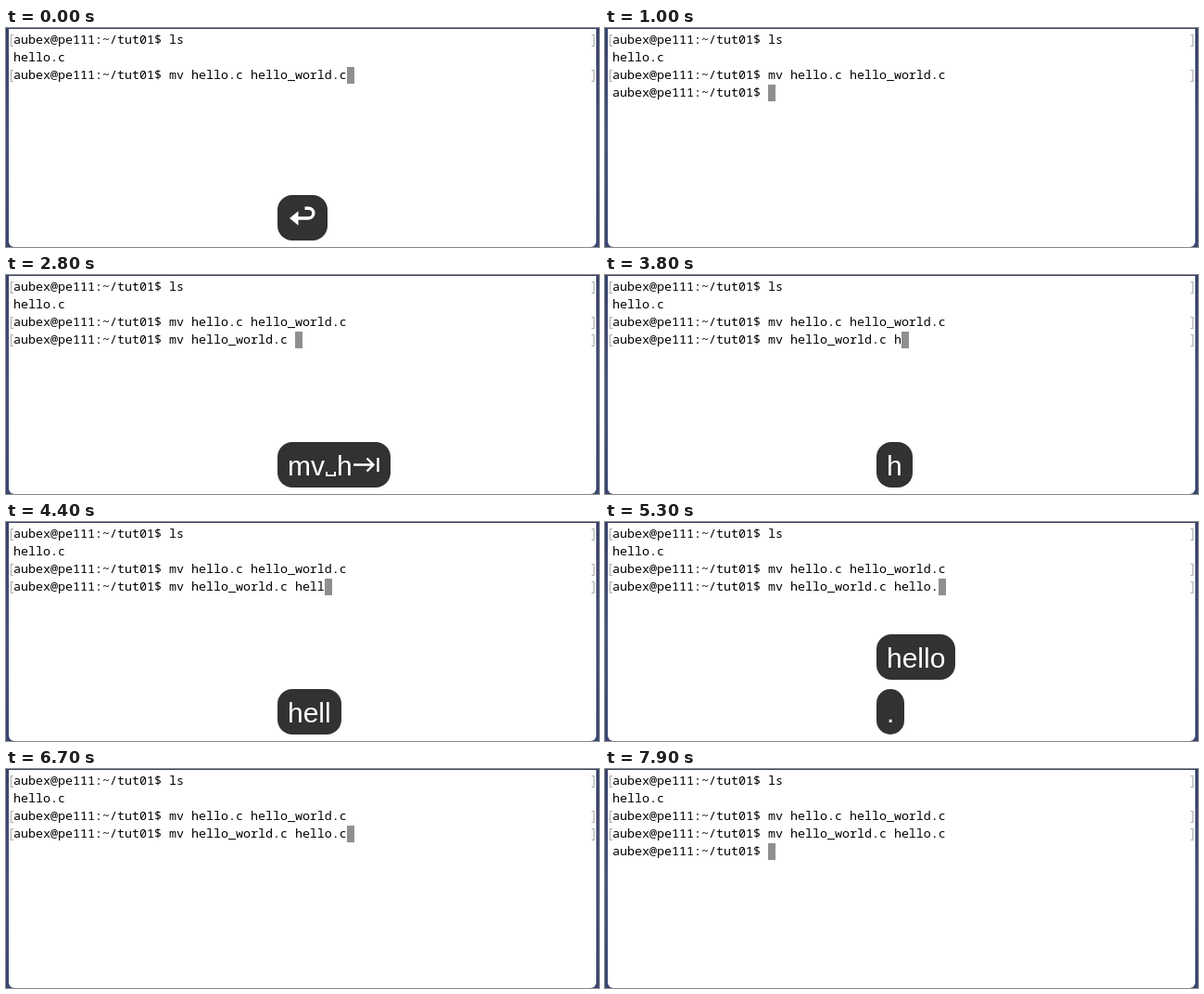
Animation of 640x236 px, one loop 8000 ms. Source, as an HTML page:

```html
<!DOCTYPE html>
<html lang="en">
<head>
<meta charset="utf-8">
<title>Renaming files in a terminal</title>
<style>
  html, body { margin: 0; width: 100%; height: 100%; overflow: hidden; }
  body { position: relative; background: linear-gradient(#36416c, #46517f 50%, #3a4672); }
  .window {
    position: absolute; inset: 1px 3px 0; background: #fff;
    border-radius: 0 0 6px 6px;
  }
  #screen {
    position: absolute; left: 8px; top: 3px; margin: 0; color: #000;
    font: 13.333px/19px "Noto Sans Mono", monospace;
  }
  #cursor { position: absolute; width: 8px; height: 18px; background: #8f8f8f; }
  .mark {
    position: absolute; left: 5px; width: 630px; height: 13px;
    --line: linear-gradient(#adadad, #adadad);
    background:
      var(--line) 0 0 / 1px 100%, var(--line) 100% 0 / 1px 100%,
      var(--line) 0 0 / 3px 1px, var(--line) 0 100% / 3px 1px,
      var(--line) 100% 0 / 3px 1px, var(--line) 100% 100% / 3px 1px;
    background-repeat: no-repeat;
  }
  .keys {
    position: absolute; left: 293px; top: 180px; height: 49px; padding: 0 11px;
    border-radius: 16px; background: #323232; color: #fff; white-space: pre;
    font: 30px/51px "Liberation Sans", Arial, sans-serif;
  }
  .keys svg {
    display: inline-block; height: 49px; vertical-align: top;
    fill: none; stroke: #fff; stroke-width: 2.4;
  }
  .keys .solid { fill: #fff; stroke: none; }
</style>
</head>
<body>
<div class="window"></div>
<div class="mark" style="top:7px"></div>
<div class="mark" style="top:45px"></div>
<div class="mark" id="lastMark" style="top:64px"></div>
<div id="cursor"></div>
<pre id="screen"></pre>

<script>
const LOOP = 8000, FADE = 200, CELL = 8, ROW = 19;
const prompt = "aubex@pe111:~/tut01$ ";
const history = prompt + "ls\nhello.c\n" + prompt + "mv hello.c hello_world.c";

// [time, text typed after the first command]
const typed = [[0, ""], [100, "\n" + prompt]];
const type = (time, text) => typed.push([time, "\n" + prompt + text]);
type(2300, "m");
type(2400, "mv");
type(2600, "mv ");
type(2700, "mv h");
type(2800, "mv hello_world.c ");
[3800, 4000, 4200, 4400, 4600, 5300, 5800].forEach((time, i) =>
  type(time, "mv hello_world.c " + "hello.c".slice(0, i + 1)));
type(7000, "mv hello_world.c hello.c\n" + prompt);

const icon = (width, shapes) => `<svg width="${width}" viewBox="0 0 ${width} 49">${shapes}</svg>`;
const enter = icon(32, `<path stroke-width="3.4" d="M9 25H22.5A5.4 5.4 0 0 0 22.5 14.2H18.5"/>
  <path class="solid" d="M2 25L11.5 17.2V32.8Z"/>`);
const space = icon(13, '<path stroke-width="2" d="M2 32V36H11V32"/>');
const tab = icon(30, '<path d="M1 24.5H22M15.5 17.5L22.5 24.5L15.5 31.5M27.5 17V32"/>');

// Key bubbles: keys with their press times, and the time the bubble is gone
const bubbles = [
  { keys: [[0, enter]], end: 700 },
  { keys: [[2200, "m"], [2300, "v"], [2500, space], [2600, "h"], [2700, tab]], end: 3700 },
  { keys: [[3700, "h"], [3900, "e"], [4100, "l"], [4300, "l"], [4500, "o"]], end: 5600 },
  { keys: [[5300, "."]], end: 6100 },
  { keys: [[5700, "c"]], end: 6700 },
  { keys: [[6900, enter]], end: 7900 }
];

const byId = id => document.getElementById(id);
const screenEl = byId("screen"), cursor = byId("cursor"), lastMark = byId("lastMark");

for (const b of bubbles) {
  b.start = b.keys[0][0];
  b.el = document.createElement("div");
  b.el.className = "keys";
  document.body.append(b.el);
}

function drawScreen(t) {
  const tail = typed.filter(([time]) => time <= t).pop()[1];
  const text = history + tail;
  const lines = text.split("\n");
  if (screenEl.textContent !== text) screenEl.textContent = text;
  cursor.style.left = 8 + lines.at(-1).length * CELL + "px";
  cursor.style.top = 4 + (lines.length - 1) * ROW + "px";
  lastMark.hidden = tail.length <= prompt.length + 1;
}

function drawBubble(b, t) {
  const shown = t >= b.start && t < b.end;
  b.el.style.display = shown ? "" : "none";
  if (!shown) return;
  const html = b.keys.filter(([time]) => time <= t).map(([, key]) => key).join("");
  if (b.html !== html) b.el.innerHTML = b.html = html;
  const above = bubbles.filter(o => o.start > b.start && o.start <= t).length;
  b.el.style.top = 180 - 59 * above + "px";
  b.el.style.opacity = Math.min(1, (b.end - t) / FADE);
}

function draw(t) {
  drawScreen(t);
  bubbles.forEach(b => drawBubble(b, t));
}

let begin;
function tick(now) {
  begin ??= now;
  draw((now - begin) % LOOP);
  requestAnimationFrame(tick);
}
draw(0);
requestAnimationFrame(tick);
</script>
</body>
</html>
```
